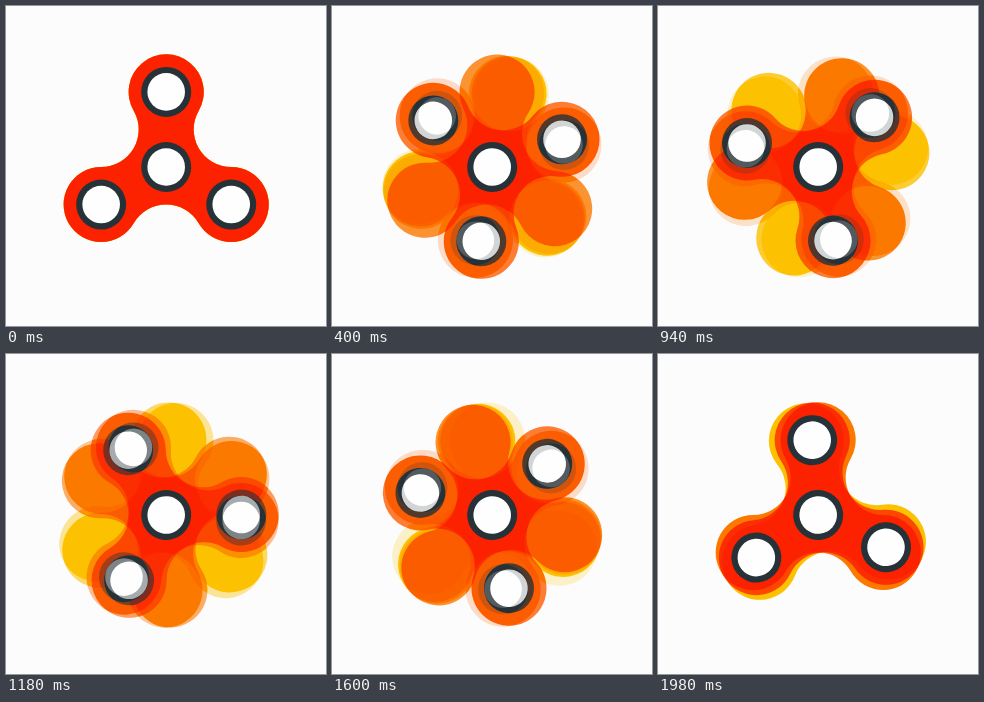
Write an HTML page that moves like this. It is 320 by 320 pixels and loops after 2 s.

```html
<!DOCTYPE html>
<html lang="en">
<head>
<meta charset="utf-8">
<title>Spinner</title>
<style>
  html, body { margin: 0; width: 100%; height: 100%; overflow: hidden; background: #fcfcfc; }
  svg { display: block; width: 100vw; height: 100vh; }
  .pose { isolation: isolate; }
  .body { mix-blend-mode: multiply; }
</style>
</head>
<body>
<svg id="stage" viewBox="0 0 320 320"></svg>
<script>
const LOOP = 2000, STEP = 20, POSES = 79, POSE_RATE = 0.8;
const CX = 160.2, CY = 161, ARM = 75.1, LOBE = ARM / 2;
const stage = document.getElementById('stage');

// Each body makes one turn per loop with its own easing; overlaps multiply.
const bodies = [
  { color: '#ffc400', ease: x => x * x },
  { color: '#ff7a00', ease: x => x * (2 - x) },
  { color: '#ff5e00', ease: x => x }
];

function add(parent, tag, attrs) {
  const node = document.createElementNS('http://www.w3.org/2000/svg', tag);
  for (const name in attrs) node.setAttribute(name, attrs[name]);
  return parent.appendChild(node);
}

function polar(radius, degrees) {
  const a = degrees * Math.PI / 180;
  return [radius * Math.sin(a), -radius * Math.cos(a)];
}

// Lobes and hollows are equal circles on the corners of a hexagon.
function bodyPath() {
  const joint = i => polar(ARM * Math.cos(Math.PI / 6), i * 60 - 30).map(v => v.toFixed(3)).join(' ');
  let d = 'M' + joint(0);
  for (let i = 0; i < 6; i++) {
    const flags = i % 2 ? '0 0' : '1 1';
    d += `A${LOBE} ${LOBE} 0 ${flags} ${joint(i + 1)}`;
  }
  return d + 'Z';
}

function addBearing(parent, [cx, cy]) {
  add(parent, 'circle', { cx, cy, r: 25, fill: '#263238' });
  add(parent, 'circle', { cx, cy, r: 18.8, fill: '#fefefe' });
}

function makePose() {
  const group = add(stage, 'g', { class: 'pose' });
  add(group, 'rect', { width: 320, height: 320, fill: '#fcfcfc' });
  const layers = bodies.map(({ color }) =>
    add(group, 'path', { class: 'body', d: bodyPath(), fill: color }));
  const bearings = add(group, 'g', {});
  addBearing(bearings, [0, 0]);
  for (let i = 0; i < 3; i++) addBearing(bearings, polar(ARM, i * 120));

  const place = (node, turns) =>
    node.setAttribute('transform', `translate(${CX} ${CY}) rotate(${360 * turns})`);
  return {
    group,
    turn(x) {
      layers.forEach((layer, i) => place(layer, bodies[i].ease(x)));
      place(bearings, x);
    }
  };
}

const current = makePose(), next = makePose();

// Evenly spaced poses are cross-faded onto a finer beat, one beat late.
function render(time) {
  const beat = Math.floor((time % LOOP) / STEP);
  const position = Math.min(POSES - 1, Math.max(0, beat - 1) * POSE_RATE);
  const index = Math.floor(position + 1e-6);
  const mix = Math.max(0, position - index);
  current.turn(index / POSES);
  next.turn((index + 1) / POSES);
  next.group.setAttribute('opacity', mix.toFixed(2));
}

const start = performance.now();

function tick() {
  render(performance.now() - start);
  requestAnimationFrame(tick);
}

tick();
</script>
</body>
</html>
```
